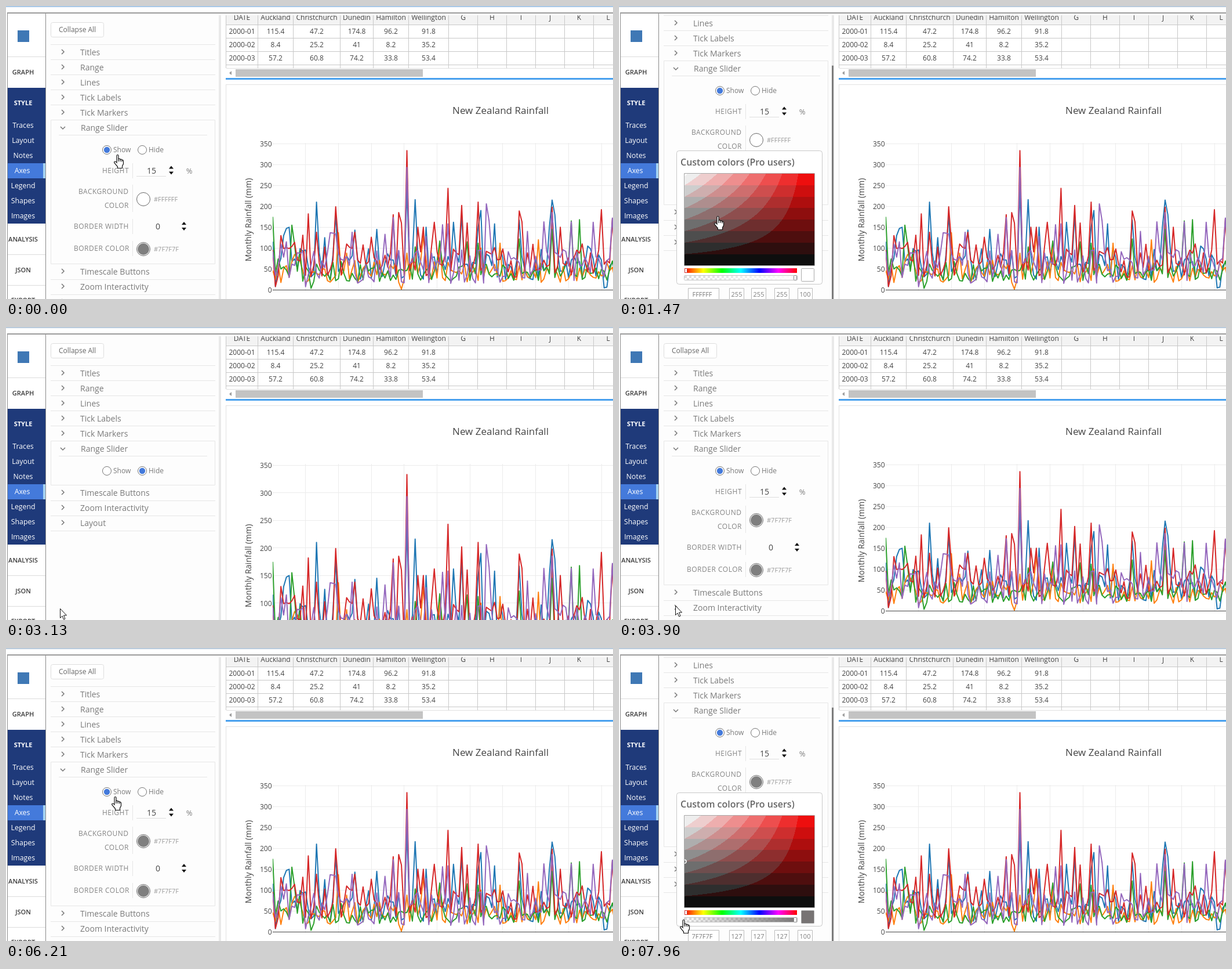
Write an HTML page with a canvas that moves like this. It is 1047 px wide and 505 px high and loops after 8000 ms.

```html
<!DOCTYPE html>
<html lang="en">
<head>
<meta charset="utf-8">
<title>Range slider settings</title>
<style>
html, body { margin: 0; width: 100%; height: 100%; overflow: hidden; background: #fff; }
canvas { display: block; }
</style>
</head>
<body>
<canvas id="stage" width="1047" height="505"></canvas>
<script>
const ctx = document.getElementById('stage').getContext('2d');
const W = 1047, H = 505, LOOP = 8000;
const PANEL_TOP = 16, PICKER_TOP = 351;
const GRAY = '#7a7a7a', PALE = '#e6e6e6';

// Step functions of time: [start, value...]
const scrollSteps = [[0, 0], [1220, 1], [1345, 52], [1470, 102], [3130, 0], [7150, 1], [7270, 52], [7390, 102]];
const cursorSteps = [
  [0, hand, 186, 256], [820, hand, 174, 316], [950, hand, 164, 362], [1900, hand, 132, 412],
  [2020, arrow, 101, 456], [2170, arrow, 93, 472], [2290, arrow, 87, 484], [2840, arrow, 93, 485],
  [3900, arrow, 97, 480], [4770, arrow, 114, 443], [4920, arrow, 136, 441], [5170, arrow, 136, 438],
  [5290, arrow, 136, 437], [5570, arrow, 141, 320], [5690, arrow, 148, 197], [5830, arrow, 160, 212],
  [5960, arrow, 172, 232], [6090, hand, 183, 252], [6210, hand, 182, 256], [6760, hand, 166, 330],
  [6880, hand, 152, 404], [7540, hand, 146, 400], [7690, hand, 128, 430], [7810, hand, 104, 462],
  [7960, hand, 105, 468]
];
const stepAt = (steps, t) => steps.filter(s => s[0] <= t).pop();

// Drawing helpers
function box(x, y, w, h, color) {
  ctx.fillStyle = color;
  ctx.fillRect(x, y, w, h);
}
const hline = (x1, x2, y, color = PALE) => box(x1, y, x2 - x1, 1, color);
const vline = (x, y1, y2, color = PALE) => box(x, y1, 1, y2 - y1, color);

function frame(x, y, w, h, r, stroke, fill) {
  ctx.beginPath();
  ctx.roundRect(x + .5, y + .5, w, h, r);
  if (fill) { ctx.fillStyle = fill; ctx.fill(); }
  ctx.strokeStyle = stroke;
  ctx.lineWidth = 1;
  ctx.stroke();
}

// y is the middle of the capital letters
function text(str, x, y, size, color, align = 'left', weight = 400, spacing = 0) {
  ctx.font = `${weight} ${size}px "Open Sans", sans-serif`;
  ctx.letterSpacing = spacing + 'px';
  ctx.textAlign = align;
  ctx.fillStyle = color;
  ctx.fillText(str, x, y + size * .36);
}

function poly(points, fill, stroke, width = 1) {
  ctx.beginPath();
  points.forEach(([x, y]) => ctx.lineTo(x, y));
  if (fill) { ctx.closePath(); ctx.fillStyle = fill; ctx.fill(); }
  if (stroke) { ctx.strokeStyle = stroke; ctx.lineWidth = width; ctx.stroke(); }
}

function disc(x, y, r, fill, stroke, width = 1) {
  ctx.beginPath();
  ctx.arc(x, y, r, 0, 7);
  if (fill) { ctx.fillStyle = fill; ctx.fill(); }
  if (stroke) { ctx.strokeStyle = stroke; ctx.lineWidth = width; ctx.stroke(); }
}

function clipped(x, y, w, h, draw) {
  ctx.save();
  ctx.beginPath();
  ctx.rect(x, y, w, h);
  ctx.clip();
  draw();
  ctx.restore();
}

// Rainfall: known peaks over a seeded base level
function random(seed) {
  return () => {
    seed = (seed * 16807) % 2147483647;
    return seed / 2147483647;
  };
}

const cities = [
  { name: 'Auckland', first: [115.4, 8.4, 57.2], x: 465, color: '#1f77b4', seed: 7129, low: 25, high: 100,
    peaks: { 4: 130, 5: 147, 6: 150, 16: 210, 19: 125, 23: 182, 30: 143, 38: 145, 49: 240, 52: 216, 56: 150,
      66: 162, 69: 180, 75: 150, 76: 190, 81: 158, 90: 167, 101: 150, 102: 215, 103: 180, 115: 105, 121: 5, 122: 7 } },
  { name: 'Christchurch', first: [47.2, 25.2, 60.8], x: 536, color: '#ff7f0e', seed: 3301, low: 18, high: 72,
    peaks: { 8: 85, 9: 79, 24: 137, 27: 88, 47: 2, 49: 88, 55: 130, 61: 105, 76: 100, 83: 112, 97: 120, 102: 164 } },
  { name: 'Dunedin', first: [174.8, 41, 74.2], x: 605, color: '#2ca02c', seed: 9041, low: 20, high: 70,
    peaks: { 7: 155, 8: 108, 10: 94, 14: 4, 52: 103, 61: 117, 71: 115, 75: 112, 90: 122, 102: 145, 109: 165, 112: 168 } },
  { name: 'Hamilton', first: [96.2, 8.2, 33.8], x: 664, color: '#d62728', seed: 5519, low: 30, high: 112,
    peaks: { 3: 130, 4: 99, 5: 101, 6: 99, 7: 104, 8: 114, 11: 131, 13: 182, 16: 138, 23: 199, 30: 138, 36: 126,
      44: 180, 46: 185, 47: 160, 49: 333, 53: 150, 55: 150, 59: 162, 64: 243, 69: 202, 71: 160, 75: 210,
      90: 189, 91: 163, 102: 198, 105: 150, 120: 192, 124: 170 } },
  { name: 'Wellington', first: [91.8, 35.2, 53.4], x: 729, color: '#9467bd', seed: 2237, low: 15, high: 98,
    peaks: { 3: 110, 5: 115, 12: 8, 21: 137, 22: 136, 23: 134, 29: 138, 41: 133, 44: 173, 49: 293, 56: 128,
      62: 156, 64: 158, 78: 206, 79: 165, 93: 140, 99: 163, 102: 185, 109: 163, 117: 162, 124: 172 } }
];
for (const c of cities) {
  const rnd = random(c.seed);
  c.values = Array.from({ length: 126 }, (_, i) => {
    const base = c.low + (c.high - c.low) * rnd() ** 1.2;
    return c.first[i] ?? c.peaks[i] ?? base;
  });
}

// Coarse saturation / value field
const palette = document.createElement('canvas');
palette.width = 224;
palette.height = 158;
{
  const pctx = palette.getContext('2d');
  const img = pctx.createImageData(224, 158);
  const coarse = v => Math.floor(v / 32) * 32 + 14;
  for (let i = 0; i < 224 * 158; i++) {
    const s = (i % 224) / 224, v = 255 * (1 - Math.floor(i / 224) / 158);
    const dull = coarse(v * (1 - s));
    img.data.set([coarse(v), dull, dull, 255], i * 4);
  }
  pctx.putImageData(img, 0, 0);
}

function drawWindow(t) {
  box(0, 0, W, H, '#fff');
  box(0, 0, W, 2, t < 120 ? '#a9c9e8' : '#b9cbdc');
  box(2, 11, W, 2, '#9a9a9a');
  box(2, 11, 1, H, '#8c8c8c');
}

function drawSidebar() {
  box(20, 42, 20, 20, '#3f78b5');
  vline(68, 13, H, '#8a8a8a');
  for (const y of [87, 428, 481]) hline(3, 68, y, '#dcdcdc');
  box(3, 141, 65, 234, '#1f3a7a');
  box(3, 271, 61, 26, '#447adb');
  box(64, 271, 4, 26, '#a5d3f2');
  const heads = { GRAPH: 114, ANALYSIS: 402, JSON: 455, EXPORT: 507 };
  for (const h in heads) text(h, 29.5, heads[h], 11, '#3c3c3c', 'center', 600);
  text('STYLE', 29.5, 167, 11, '#fff', 'center', 700);
  ['Traces', 'Layout', 'Notes', 'Axes', 'Legend', 'Shapes', 'Images'].forEach((s, i) =>
    text(s, s === 'Axes' ? 28 : 29.5, 206 + 26 * i, 12.3, '#fff', 'center'));
}

function drawTable() {
  clipped(379, PANEL_TOP, W, 92, () => {
    box(380, 16, W, 16, '#f3f3f3');
    for (const y of [32, 55, 78, 101]) hline(380, W, y, '#c8c8c8');
    const cols = [379, 434, 495, 576, 633, 694];
    for (let x = 763; x < W; x += 50) cols.push(x);
    for (const x of cols) vline(x, 16, 107, '#c8c8c8');
    const put = (s, x, y) => text(s, x, y, 12, '#444', 'center');
    put('DATE', 407, 20);
    [...'GHIJKL'].forEach((s, i) => put(s, 788.5 + 50 * i, 20));
    for (const c of cities) {
      put(c.name, c.x, 20);
      c.first.forEach((v, i) => put(v, c.x, 44 + 23 * i));
    }
    for (let i = 0; i < 3; i++) put('2000-0' + (i + 1), 407, 44 + 23 * i);
  });
  hline(380, W, 107, '#e0e0e0');
  box(396, 109, 323, 13, '#c3c3c3');
  poly([[385, 115.5], [389, 112], [389, 119]], '#9a9a9a');
  box(379, 124, W, 3, '#48a0ee');
}

function drawChart(tall) {
  hline(379, W, 135, '#e2e2e2');
  vline(379, 135, H, '#e2e2e2');
  text('New Zealand Rainfall', 853, 180, 17, '#444', 'center');
  const zero = tall ? 571 : 489.5, scale = tall ? .951 : .7214;
  const yOf = v => zero - v * scale;

  clipped(460, 236, W, Math.min(H, zero) - 235, () => {
    for (let k = 1; k <= 10; k++) vline(Math.round(460 + 56.7 * k - .5), 236, H, '#ececec');
    for (let v = 50; v <= 350; v += 50) hline(460, W, Math.round(yOf(v) - .5), '#ececec');
    hline(460, W, Math.floor(zero), '#444');
    ctx.lineJoin = 'round';
    for (const c of cities) {
      poly(c.values.map((v, i) => [460 + 4.725 * i, yOf(v)]), null, c.color, 2);
    }
    ctx.lineJoin = 'miter';
  });
  for (let v = 0; v <= 350; v += 50) text(v, 458.5, yOf(v) + .5, 12, '#444', 'right');

  ctx.save();
  ctx.translate(418, tall ? 411.5 : 368.5);
  ctx.rotate(-Math.PI / 2);
  text('Monthly Rainfall (mm)', 0, 0, 14, '#444', 'center');
  ctx.restore();
}

function chevron(x, y, down) {
  poly(down ? [[x - 4, y - 2], [x, y + 2], [x + 4, y - 2]] : [[x - 2, y - 4], [x + 2, y], [x - 2, y + 4]],
    null, '#777', 1.5);
}

function spinner(x, y) {
  poly([[x - 4, y - 3], [x, y - 8], [x + 4, y - 3]], '#111');
  poly([[x - 4, y + 2], [x, y + 7], [x + 4, y + 2]], '#111');
}

function radio(x, label, on) {
  disc(x, 248, 7.5, '#fff', '#777');
  if (on) disc(x, 248, 5.2, '#447adb');
  text(label, x + 11, 248, 12, GRAY);
}

function swatch(y, color) {
  disc(237, y, 11.5, '#fff', '#666');
  if (color !== '#FFFFFF') disc(237, y, 10, color);
  text(color, 255, y, 11, '#999');
}

function drawSettings(color) {
  const label = (s, x, y) => text(s, x, y, 12, '#858585', 'left', 400, .5);
  label('HEIGHT', 166, 284);
  label('BACKGROUND', 125, 320);
  label('COLOR', 170, 344);
  label('BORDER WIDTH', 117, 380);
  label('BORDER COLOR', 117, 418);
  for (const [a, b] of [[271, 297], [308, 355], [367, 393], [405, 431]]) vline(218, a, b);
  text('15', 251, 283.5, 14, '#444', 'center');
  hline(225, 276, 293, '#dedede');
  spinner(285, 283.5);
  text('%', 316, 284, 13, GRAY, 'center');
  swatch(333, color);
  text('0', 262, 380, 14, '#444', 'center');
  spinner(307, 380);
  swatch(419, '#7F7F7F');
}

function drawPicker(color) {
  const white = color === '#FFFFFF', shown = white ? '#fff' : '#777373';
  frame(99, PICKER_TOP, 251, 230, 4, '#c8c8c8', '#fff');
  text('Custom colors (Pro users)', 106, 371, 16, '#666', 'left', 600);
  ctx.drawImage(palette, 113, 391);
  frame(112, 390, 225, 159, 0, '#aaa');
  clipped(113, 391, 224, 158, () => disc(113, white ? 391 : 470, 3, null, '#fff', 1.5));

  const hue = ctx.createLinearGradient(113, 0, 307, 0);
  for (let i = 0; i <= 6; i++) hue.addColorStop(i / 6, `hsl(${i * 60} 100% 50%)`);
  box(113, 554, 194, 8, hue);
  frame(113, 554, 4, 7, 1, '#b33', '#fff');

  for (let i = 0; i < 96; i++) {
    const x = 113 + (i >> 1) * 4, y = 567 + (i & 1) * 4;
    box(x, y, 4, 4, ((i >> 1) + i) & 1 ? '#fff' : '#dcdcdc');
  }
  const fade = ctx.createLinearGradient(113, 0, 307, 0);
  const tone = white ? '255,255,255' : '120,118,118';
  fade.addColorStop(0, `rgba(${tone},0)`);
  fade.addColorStop(1, `rgba(${tone},1)`);
  box(113, 567, 194, 8, fade);
  frame(112, 566, 195, 8, 1, '#c4c4c4');
  frame(301, 566, 5, 8, 1, '#888', '#fff');

  frame(314, 554, 22, 22, 1, '#aaa', shown);
  const part = white ? '255' : '127';
  const field = (x, w, s, tx) => {
    frame(x, 588, w, 19, 0, '#bbb', '#fff');
    text(s, tx, 599, 11, GRAY, 'center');
  };
  field(119, 53, color.slice(1), 143.5);
  [190, 228, 268].forEach(x => field(x, 25, part, x + 13));
  field(308, 25, '100', 321);
}

function drawPanel(scroll, open, hidden, color) {
  clipped(69, PANEL_TOP, 304, H, () => {
    box(69, PANEL_TOP, 298, H, '#fdfdfd');
    box(367, PANEL_TOP, 4, H, '#e9e9e9');
    if (open) box(367, PANEL_TOP + scroll * .85, 3, 405, '#7c7c7c');

    ctx.translate(0, -scroll);
    frame(77, 28, 91, 25, 3, '#dedede', '#fff');
    text('Collapse All', 91, 41, 12, '#666');
    const row = (s, y) => {
      chevron(98, y - 1);
      text(s, 128, y, 14, GRAY);
    };
    ['Titles', 'Range', 'Lines', 'Tick Labels', 'Tick Markers'].forEach((s, i) => {
      hline(77, 361, 66 + 26 * i);
      row(s, 80 + 26 * i);
    });
    const bottom = hidden ? 272 : 444;
    frame(77, 196, 283, bottom - 196, 0, PALE);
    chevron(98, 210, true);
    text('Range Slider', 129, 210, 14, GRAY);
    hline(91, 347, 222);
    radio(174, 'Show', !hidden);
    radio(235, 'Hide', hidden);
    if (!hidden) drawSettings(color);
    ['Timescale Buttons', 'Zoom Interactivity', 'Layout'].forEach((s, i) => {
      row(s, bottom + 14 + 26 * i);
      hline(77, 361, bottom + 27 + 26 * i);
    });
    if (open) drawPicker(color);
  });
}

function arrow() {
  poly([[.5, .5], [.5, 16.5], [4, 13], [6.5, 19], [9, 18], [6.5, 12], [11.5, 12]], '#fff', '#111');
}

function hand() {
  ctx.stroke(Object.assign(new Path2D()));
  const p = new Path2D('M5 14V2Q5 .5 6.5 .5T8 2V7.5Q10.5 6.5 11 8.5Q13.5 7.5 14 9.5Q16.5 9 16.5 11.5V16L14.5 20V23.5H6.5V21L1 14.5Q0 12 2 12Q3.5 12 5 14Z');
  ctx.fillStyle = '#fff';
  ctx.fill(p);
  ctx.strokeStyle = '#111';
  ctx.lineWidth = 1.2;
  ctx.stroke(p);
  ctx.stroke(new Path2D('M8 7.5V12M11 8.5V12M14 9.5V12.5'));
}

function drawCursor(t) {
  const [, shape, x, y] = stepAt(cursorSteps, t);
  ctx.save();
  ctx.translate(x, y);
  shape();
  ctx.restore();
}

function render(now) {
  const t = now % LOOP;
  const hidden = t >= 3130 && t < 3250;
  const open = (t >= 390 && t < 3130) || t >= 6510;
  drawWindow(t);
  drawSidebar();
  drawTable();
  drawChart(hidden);
  drawPanel(stepAt(scrollSteps, t)[1], open, hidden, t < 3130 ? '#FFFFFF' : '#7F7F7F');
  drawCursor(t);
}

const start = performance.now();
function tick() {
  render(performance.now() - start);
  requestAnimationFrame(tick);
}
tick();
</script>
</body>
</html>
```
